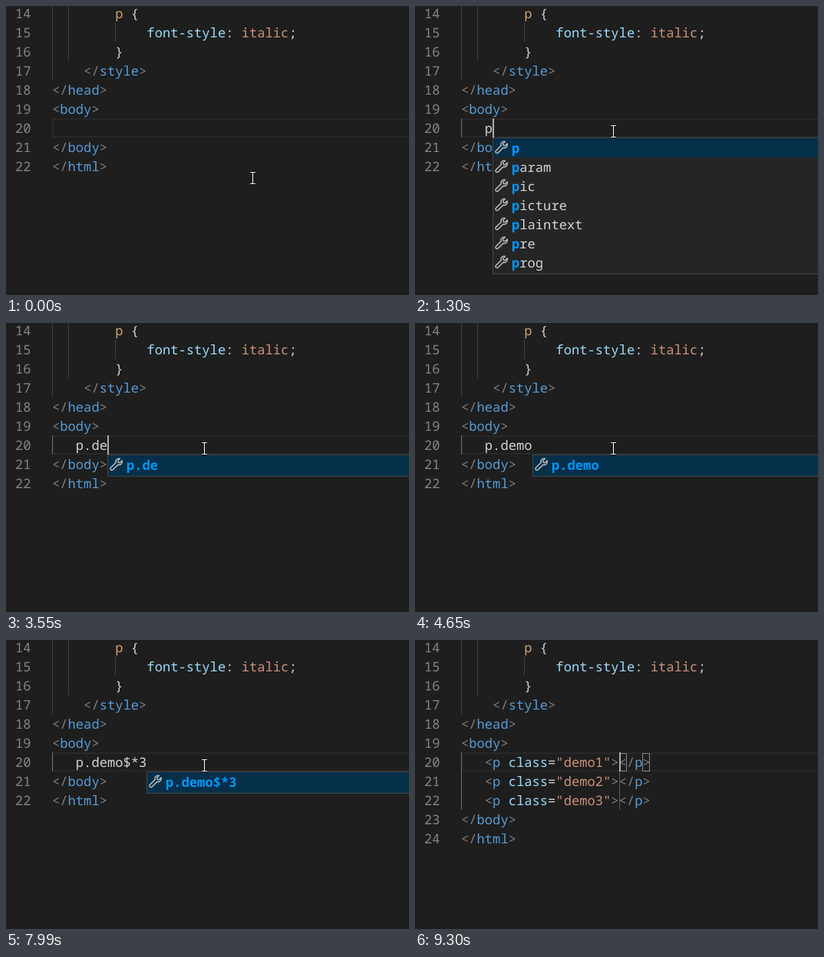
Animation of 525 by 378 pixels, one loop 9620 ms. Source, as an HTML page with a canvas:

```html
<!DOCTYPE html>
<html lang="en">
<head>
<meta charset="utf-8">
<title>Abbreviation typing</title>
<style>
  html, body { margin: 0; height: 100%; overflow: hidden; background: #1e1e1e; }
  canvas { display: block; }
</style>
</head>
<body>
<canvas id="stage" width="525" height="378"></canvas>
<script>
const ctx = document.getElementById('stage').getContext('2d');
const LOOP = 9620, EXPAND = 8140;
const LEFT = 60, CHAR = 10.28, LINE = 25;
const FONT = '17.13px "Noto Sans Mono", "DejaVu Sans Mono", monospace';
const TEXT = '#d4d4d4', GREY = '#808080', TAG = '#569cd6', ATTR = '#9cdcfe',
      VALUE = '#ce9178', SELECTOR = '#d2a273', NUMBER = '#858585', MATCH = '#0097fb';

const keys = [[1300, 'p'], [3160, '.'], [3480, 'd'], [3550, 'e'], [3950, 'm'],
              [4190, 'o'], [5890, '$'], [6820, '*'], [7510, '3']];
// The caret alternates between shown and hidden at these times
const caretToggles = [520, 1000, 1300, 1780, 2240, 2780, 3160, 4650, 5200, 5660,
                      5890, 6350, 6820, 7280, 7510, 7990, 8140, 8600, 9100];
const tagNames = ['p', 'param', 'pic', 'picture', 'plaintext', 'pre', 'prog'];

const lineY = line => (line - 14) * LINE - 3;
const colX = col => LEFT + col * CHAR;

function rect(x, y, w, h, color) {
  ctx.fillStyle = color;
  ctx.fillRect(x, y, w, h);
}

function frame(x, y, w, h, color) {
  ctx.strokeStyle = color;
  ctx.lineWidth = 1;
  ctx.strokeRect(x + .5, y + .5, w - 1, h - 1);
}

// Sets characters on the fixed grid and returns the x after the last one
function write(str, x, y, color, bold) {
  ctx.font = (bold ? 'bold ' : '') + FONT;
  ctx.fillStyle = color;
  for (const ch of str) {
    ctx.fillText(ch, x, y + 18.5);
    x += CHAR;
  }
  return x;
}

function code(line, col, ...runs) {
  let x = colX(col);
  for (const [str, color] of runs) x = write(str, x, lineY(line), color);
}

function tag(line, col, open, name) {
  code(line, col, [open, GREY], [name, TAG], ['>', GREY]);
}

function guide(col, line, lines, color = '#404040') {
  rect(Math.round(colX(col)), lineY(line), 1, lines * LINE, color);
}

function wrench(x, y) {
  ctx.save();
  ctx.translate(x, y);
  ctx.rotate(Math.PI / 4);
  ctx.strokeStyle = '#c5c5c5';
  ctx.lineWidth = 1.4;
  ctx.lineJoin = 'round';
  ctx.beginPath();
  ctx.moveTo(-1.9, -1.6);
  ctx.lineTo(-1.9, 8);
  ctx.arc(0, 8, 1.9, Math.PI, 0, true);
  ctx.lineTo(1.9, -1.6);
  ctx.arc(0, -5.2, 4.2, 1.1, -1.1, true);
  ctx.lineTo(1.9, -5);
  ctx.lineTo(0, -3.9);
  ctx.lineTo(-1.9, -5);
  ctx.lineTo(-1.9, -8.9);
  ctx.arc(0, -5.2, 4.2, Math.PI + 1.1, Math.PI - 1.1, true);
  ctx.closePath();
  ctx.stroke();
  ctx.restore();
}

function popup(typed) {
  const items = typed === 'p' ? tagNames : [typed];
  const x = Math.round(colX(3 + typed.length)), y = 172;
  const height = items.length * LINE + 4;
  rect(x, y, 600, height, '#252526');
  rect(x + 1, y + 1, 600, items.length > 1 ? LINE : LINE + 2, '#062f4a');
  frame(x, y, 600, height, '#454545');
  items.forEach((item, i) => {
    const rowY = y + 1 + i * LINE;
    wrench(x + 11.5, rowY + 12);
    const end = write(typed, x + 25, rowY, MATCH, true);
    write(item.slice(typed.length), end, rowY, TEXT);
  });
}

function pointer(x, y) {
  const strokes = [['#000', 3], ['#fff', 1.2]];
  for (const [color, width] of strokes) {
    ctx.strokeStyle = color;
    ctx.lineWidth = width;
    ctx.beginPath();
    ctx.moveTo(x - 3, y - 7.5);
    ctx.lineTo(x + 4, y - 7.5);
    ctx.moveTo(x + .5, y - 7.5);
    ctx.lineTo(x + .5, y + 7.5);
    ctx.moveTo(x - 3, y + 7.5);
    ctx.lineTo(x + 4, y + 7.5);
    ctx.stroke();
  }
}

function pointerAt(t) {
  const steps = (start, count) =>
    Math.min(1, Math.max(0, Math.floor((t - start) / 75) + 1) / count);
  const ease = p => p * p * (3 - 2 * p);
  const enter = ease(steps(70, 7)), leave = ease(steps(9000, 4));
  return [321 - 63 * enter + 202 * leave, 225 - 61 * enter + 199 * leave].map(Math.round);
}

function draw(t) {
  const expanded = t >= EXPAND;
  const typed = keys.filter(([time]) => t >= time).map(([, ch]) => ch).join('');
  const shift = expanded ? 2 : 0;

  rect(0, 0, 525, 378, '#1e1e1e');
  ctx.strokeStyle = '#282828';
  ctx.lineWidth = 2;
  ctx.strokeRect(61, 148, 600, 23);
  guide(0, 14, 4);
  guide(2, 14, 3);
  guide(8, 15, 1);
  if (typed) guide(0, 20, 1 + shift, '#707070');

  for (let n = 14; n <= 22 + shift; n++) write(String(n), 12, lineY(n), NUMBER);
  code(14, 8, ['p', SELECTOR], [' {', TEXT]);
  code(15, 12, ['font-style', ATTR], [': ', TEXT], ['italic', VALUE], [';', TEXT]);
  code(16, 8, ['}', TEXT]);
  tag(17, 4, '</', 'style');
  tag(18, 0, '</', 'head');
  tag(19, 0, '<', 'body');
  tag(21 + shift, 0, '</', 'body');
  tag(22 + shift, 0, '</', 'html');

  let caretCol = 3;
  if (expanded) {
    caretCol = 20;
    for (let i = 1; i <= 3; i++) {
      code(19 + i, 3, ['<', GREY], ['p', TAG], [' class', ATTR], ['=', TEXT],
        [`"demo${i}"`, VALUE], ['></', GREY], ['p', TAG], ['>', GREY]);
    }
    rect(266, 147, 1, 75, '#5c5c5c');
    for (const col of [20, 23]) frame(Math.round(colX(col)), 148, 10, 24, '#888');
  } else if (typed) {
    code(20, 3, [typed, TEXT]);
    caretCol += typed.length;
    popup(typed);
  }

  if (caretToggles.filter(time => t >= time).length % 2) {
    rect(Math.round(colX(caretCol)), 147, 2, LINE, '#aeafad');
  }
  if (t < 9300) pointer(...pointerAt(t));
}

ctx.textRendering = 'geometricPrecision';
function tick() {
  draw(performance.now() % LOOP);
  requestAnimationFrame(tick);
}
tick();
</script>
</body>
</html>
```
